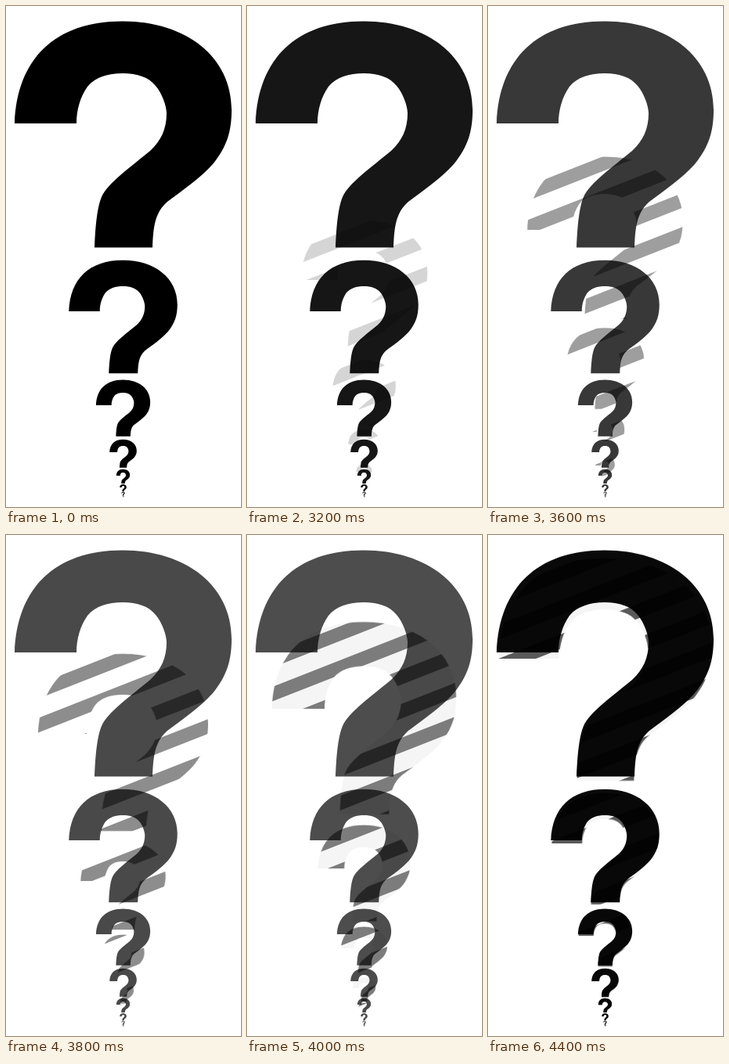
Recreate the animation shown at these times as an HTML page. Size 300 px wide and 640 px high, loop 4450 ms.

```html
<!DOCTYPE html>
<html lang="en">
<head>
<meta charset="utf-8">
<title>Endless question</title>
<style>
  html, body { margin: 0; width: 100%; height: 100%; overflow: hidden; background: #fff; }
  svg { display: block; width: 300px; height: 640px; }

  .still, .bands, .gaps, .zoom { animation: 4450ms infinite step-end; }
  .still { animation-name: fade; }
  .bands { animation-name: bands; }
  .gaps { animation-name: gaps; }
  .zoom { animation-name: zoom; transform-origin: 149.5px 630px; }

  /* hold for 3000 ms, then 29 steps of 50 ms */
  @keyframes fade {
    0% { opacity: 1; }
    67.415% { opacity: .98333; animation-timing-function: steps(19); }
    88.7635% { opacity: .66667; animation-timing-function: steps(10); }
    100% { opacity: 1; }
  }
  @keyframes bands {
    0% { opacity: 0; }
    67.415% { opacity: .03333; animation-timing-function: steps(9); }
    77.5275% { opacity: .33333; animation-timing-function: steps(20); }
    100% { opacity: .66667; }
  }
  @keyframes gaps {
    0% { opacity: 0; }
    86.516% { opacity: .043; }
    100% { opacity: .043; }
  }
  @keyframes zoom {
    0% { transform: scale(.5); }
    67.415% { transform: scale(.51667); animation-timing-function: steps(29); }
    100% { transform: scale(1); }
  }
</style>
</head>
<body>
<svg viewBox="0 0 300 640">
  <defs>
    <path id="hook" d="M11 150C14 68 62 19.5 149 19.5C230 19.5 288 65 288 133C288 160 282 180 264 202
      C248 220 222 238 206 250C190 264 188 282 187 308.5H113C114 284 116 258 122 244
      C130 226 160 205 184 185C198 172 205 157 205 137C205 128 199 111 191 102
      C182 91 168 86 149 86C130 86 114 91 104 103C95 116 90 132 90 150Z"/>
    <!-- each mark is half the one above, shrinking towards (149.5, 630) -->
    <g id="pair">
      <use href="#hook"/>
      <use href="#hook" transform="translate(74.75 315) scale(.5)"/>
    </g>
    <g id="four">
      <use href="#pair"/>
      <use href="#pair" transform="translate(112.125 472.5) scale(.25)"/>
    </g>
    <g id="marks">
      <use href="#four"/>
      <use href="#four" transform="translate(140.15625 590.625) scale(.0625)"/>
    </g>
    <path id="slats" d="M150 -9.85V800" stroke="#fff" stroke-width="340" transform="skewY(-21.46)"/>
    <mask id="on" maskUnits="userSpaceOnUse" x="0" y="0" width="300" height="640">
      <use href="#slats" stroke-dasharray="18.7 24.6"/>
    </mask>
    <mask id="off" maskUnits="userSpaceOnUse" x="0" y="0" width="300" height="640">
      <use href="#slats" stroke-dasharray="0 18.7 24.6 0"/>
    </mask>
  </defs>
  <g class="still"><use href="#marks"/></g>
  <g class="gaps" mask="url(#off)"><g class="zoom"><use href="#marks"/></g></g>
  <g class="bands" mask="url(#on)"><g class="zoom"><use href="#marks"/></g></g>
</svg>
</body>
</html>
```
